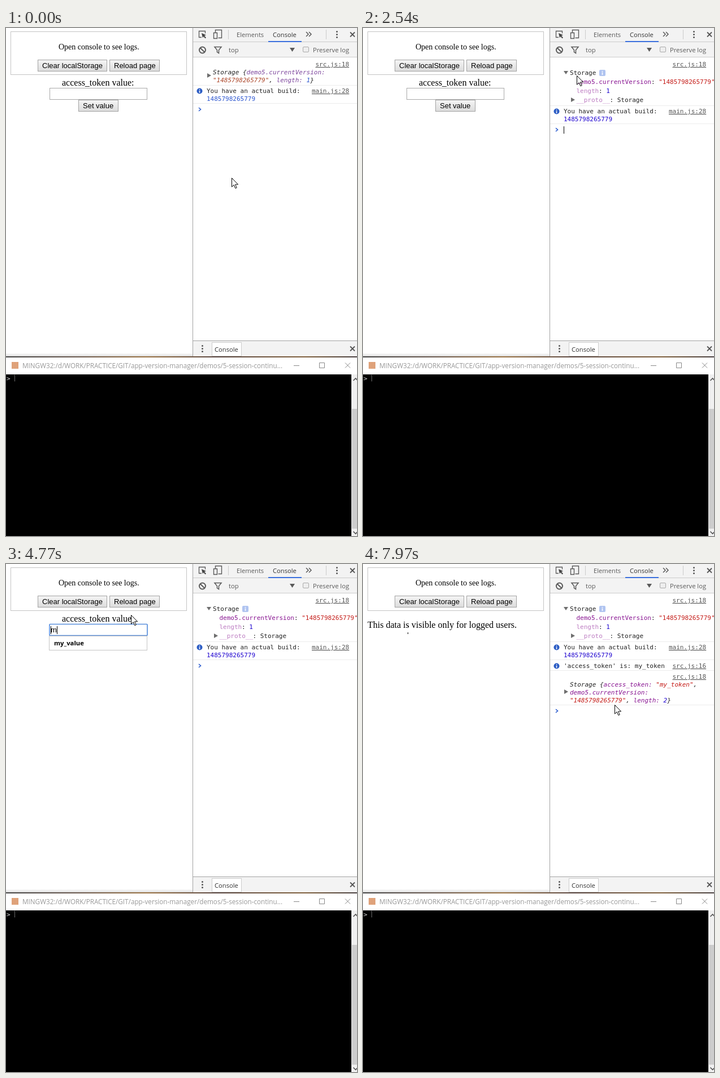
An HTML page that plays this animation: 621 by 899 pixels, repeating every 8 s.

```html
<!DOCTYPE html>
<html lang="en">
<head>
<meta charset="utf-8">
<title>Console demo</title>
<style>
html, body { margin: 0; width: 100%; height: 100%; overflow: hidden; background: #fff; }
svg { display: block; width: 621px; height: 899px; }
text { white-space: pre; }
.serif { font: 16px "Liberation Serif", serif; }
.sans { font: 13px "Liberation Sans", sans-serif; }
.ui { font: 11.2px "Open Sans", sans-serif; fill: #5a5a5a; }
.mono { font: 11px "DejaVu Sans Mono", monospace; fill: #222; }
.it { font-style: italic; }
.link { fill: #545454; text-decoration: underline; }
.k { fill: #7c449c; }
.s { fill: #ab4528; }
.n { fill: #2b55cf; }
.fresh .k { fill: #881391; }
.fresh .s { fill: #c41a16; }
.fresh .n { fill: #1c00cf; }
.dim { opacity: .55; }
.btn { fill: url(#face); stroke: #a2a2a2; }
.btn.over { stroke: #666; }
.row { stroke: #ececec; }
.line { fill: none; stroke: #5a5a5a; }
</style>
</head>
<body>
<svg id="stage" viewBox="0 0 621 899">
  <defs>
    <linearGradient id="face" x2="0" y2="1"><stop stop-color="#f5f5f5"/><stop offset="1" stop-color="#dcdcdc"/></linearGradient>
    <linearGradient id="strip"><stop stop-color="#444"/><stop offset=".2" stop-color="#6b5a50"/><stop offset=".4" stop-color="#9a7242"/><stop offset=".6" stop-color="#5a4640"/><stop offset=".85" stop-color="#80603c"/><stop offset="1" stop-color="#484040"/></linearGradient>
    <linearGradient id="shade" x2="0" y2="1"><stop stop-color="#fff"/><stop offset="1" stop-color="#ddd"/></linearGradient>
    <path id="cross" d="M0 0l8 8m0-8l-8 8" fill="none" stroke="#555" stroke-width="1.8"/>
    <path id="dots" d="M0 0h0m0 5h0m0 5h0" stroke="#555" stroke-width="3" stroke-linecap="round"/>
    <path id="closed" d="M0 0l7 4-7 4z" fill="#6e6e6e"/>
    <g id="info"><circle r="5" fill="#2b5cc4"/><path d="M0-3v1.6M0-.6v3.8" stroke="#fff" stroke-width="1.6"/></g>
  </defs>

  <!-- page -->
  <rect x="8.5" y="6.5" width="311" height="76" fill="none" stroke="#c4c4c4"/>
  <text class="serif" x="93" y="38" style="font-size:14px">Open console to see logs.</text>
  <rect class="btn" x="56.5" y="56.5" width="122" height="20"/>
  <text class="sans" x="64" y="71">Clear localStorage</text>
  <rect class="btn" x="183.5" y="56.5" width="88" height="20"/>
  <text class="sans" x="191" y="71">Reload page</text>
  <g id="form">
    <text class="serif" x="99" y="102">access_token value:</text>
    <rect x="77.5" y="106.5" width="172" height="20" fill="#fff" stroke="#a9a9a9"/>
    <rect class="btn" x="128.5" y="127.5" width="70" height="20"/>
    <text class="sans" x="136" y="142">Set value</text>
    <g id="focus">
      <rect x="77" y="106.5" width="173" height="20" rx="1" fill="#fff" stroke="#5a8fdc" stroke-width="1.7"/>
      <rect x="79" y="110" width="1" height="14"/>
      <text class="sans" id="typed" x="79" y="121"></text>
      <rect id="caret" y="110" width="1" height="14"/>
    </g>
    <g id="hint">
      <rect x="76.5" y="127.5" width="173" height="25" fill="#fff" stroke="#c4c4c4"/>
      <text x="85" y="144" style="font:bold 11.3px 'Open Sans',sans-serif">my_value</text>
    </g>
  </g>
  <g id="done">
    <text class="serif" x="8" y="113">This data is visible only for logged users.</text>
    <path d="M79.5 110v1m0 10v3" stroke="#000"/>
  </g>
  <rect y="575" width="330" height="6" fill="url(#shade)"/>

  <!-- console log -->
  <g id="log">
    <text class="mono link" x="547.5" y="68">src.js:18</text>
    <g id="brief">
      <use href="#closed" x="356" y="80"/>
      <text class="mono it" x="366" y="82">Storage {<tspan class="k">demo5.currentVersion:</tspan></text>
      <text class="mono it" x="366" y="96"><tspan class="s">"1485798265779"</tspan>, <tspan class="k">length:</tspan> <tspan class="n">1</tspan>}</text>
    </g>
    <g id="full">
      <path d="M355 76h8l-4 6z" fill="#6e6e6e"/>
      <text class="mono" x="366" y="83">Storage</text>
      <rect x="418" y="74" width="11" height="11" rx="2" fill="#b0c4f0"/>
      <path d="M423.5 76v1.5m0 1v4.5" stroke="#fff" stroke-width="1.5"/>
      <text class="mono" x="377.5" y="99"><tspan class="k">demo5.currentVersion</tspan>: <tspan class="s">"1485798265779"</tspan></text>
      <text class="mono k dim" x="377.5" y="115">length</text>
      <text class="mono" x="417" y="115">: <tspan class="n">1</tspan></text>
      <use href="#closed" x="368" y="123"/>
      <text class="mono k dim" x="377.5" y="131">__proto__</text>
      <text class="mono" x="436.5" y="131">: Storage</text>
    </g>
    <g id="build">
      <path class="row" d="M331 101.5h290M331 133.5h290"/>
      <use href="#info" x="342.5" y="111.5"/>
      <text class="mono" x="355" y="115">You have an actual build:</text>
      <text class="mono link" x="541" y="115">main.js:28</text>
      <text class="mono n" x="355" y="129">1485798265779</text>
    </g>
    <g id="token">
      <path class="row" d="M331 188.5h290M331 249.5h290"/>
      <use href="#info" x="342.5" y="180.5"/>
      <text class="mono" x="355" y="184">'access_token' is: my_token</text>
      <text class="mono link" x="547.5" y="184">src.js:16</text>
      <text class="mono link" x="547.5" y="203">src.js:18</text>
      <use href="#closed" x="356" y="222"/>
      <text class="mono it" x="366" y="217">Storage {<tspan class="k">access_token:</tspan> <tspan class="s">"my_token"</tspan>,</text>
      <text class="mono it k" x="366" y="231">demo5.currentVersion:</text>
      <text class="mono it" x="366" y="245"><tspan class="s">"1485798265779"</tspan>, <tspan class="k">length:</tspan> <tspan class="n">2</tspan>}</text>
    </g>
  </g>
  <g id="prompt">
    <path d="M341 141l3.5 3-3.5 3" fill="none" stroke="#2b5ccf" stroke-width="1.6"/>
    <rect id="bar" x="355" y="138" width="1" height="13"/>
  </g>
  <g id="tip">
    <rect x="429" y="112" width="138" height="25" rx="2" fill="#000" opacity=".12"/>
    <rect x="427.5" y="110.5" width="138" height="25" rx="1" fill="#fff" stroke="#bbb"/>
    <text class="ui" x="434" y="127" style="font-size:10.3px;fill:#888">["demo5.currentVersion"]</text>
  </g>

  <!-- developer tools frame -->
  <path d="M331 0h290v52h-290zM331 554h290v27h-290z" fill="#f3f3f3"/>
  <path d="M331 24.5h290M331 51.5h290M393.5 3v17M566.5 3v17" stroke="#ccc"/>
  <path d="M330.5 0v581M331 553.5h290" stroke="#a3a3a3"/>
  <rect x="464" y="23" width="59" height="2" fill="#3b70dd"/>
  <path class="line" d="M346 16.5h-4.5v-11h11v4" stroke-width="1.3"/>
  <path d="M346 9l8 3.5-3 1.2 3 3.3-1.5 1.4-3-3.4-1.5 2.6z" fill="#444"/>
  <path class="line" d="M370.5 8v-4.500h11v14h-6M367.500 8.500h6v10h-6z" stroke-width="1.4"/>
  <text class="ui" x="408" y="16">Elements</text>
  <text class="ui" x="472" y="16" style="fill:#333">Console</text>
  <path class="line" d="M531 7l4 4-4 4m5-8l4 4-4 4" stroke-width="1.5"/>
  <use href="#dots" x="585.5" y="6.500"/>
  <use href="#cross" x="609" y="7.500"/>
  <path class="line" d="M343.500 35l8 8M353 39a5.500 5.500 0 1 0-11 0a5.500 5.500 0 1 0 11 0" stroke-width="2"/>
  <path class="line" d="M369 33.500h12l-4.500 5.500v5.500l-3-2v-3.500z" stroke-width="1.500"/>
  <text class="ui" x="394" y="43">top</text>
  <path d="M502 35h9l-4.500 7z" fill="#5a5a5a"/>
  <rect x="525.5" y="33.5" width="10" height="9" rx="1.5" fill="#eee" stroke="#aaa"/>
  <text class="ui" x="543" y="43">Preserve log</text>
  <use href="#dots" x="347.5" y="562.500"/>
  <rect x="364.5" y="556.5" width="52" height="24" fill="#fff" stroke="#ccc"/>
  <text class="ui" x="369" y="573" style="fill:#333">Console</text>
  <use href="#cross" x="609" y="563.500"/>

  <!-- terminal window -->
  <rect y="581" width="621" height="2" fill="url(#strip)"/>
  <rect y="583" width="621" height="30" fill="#fff"/>
  <rect x="10" y="591" width="12" height="12" fill="#dfa27a"/>
  <text class="ui" x="29" y="602" style="font-size:11.7px;fill:#999">MINGW32:/d/WORK/PRACTICE/GIT/app-version-manager/demos/5-session-continu...</text>
  <path d="M509 597.500h10M554.500 592.500h9v9h-9zM600 592.500l9 9m0-9l-9 9" fill="none" stroke="#888"/>
  <rect y="613" width="611" height="286"/>
  <text class="mono" x="1" y="624" style="fill:#ddd">&gt;</text>
  <path d="M15.500 614v12" stroke="#ccc" stroke-dasharray="1 1"/>
  <rect x="611" y="613" width="10" height="286" fill="#f0f0f0"/>
  <rect x="612" y="674" width="9" height="212" fill="#cdcdcd"/>
  <path d="M614.500 624l4-4 4 4M614.500 891l4 4 4-4" fill="none" stroke="#555" stroke-width="1.600"/>

  <path id="mouse" d="M.5.5v15.700l3.700-3.500 2.600 6 2.400-1-2.600-5.800h5z" fill="#fff" stroke="#000"/>
</svg>
<script>
const $ = id => document.getElementById(id);
const show = (id, on) => $(id).style.display = on ? "" : "none";
const within = (t, a, b) => t >= a && t < b;

const LOOP = 8000, CLEAR = 1590, RELOADED = 1690, EXPAND = 2480, FOCUS = 4000, LOGIN = 7360;
const WORD = "my_token";
const KEY_TIMES = [4770, 4920, 5200, 5660, 5740, 5940, 6020, 6170];

// start, end, number of steps, evenly timed points
const MOVES = [
  [290, 1060, 16, [[399, 265], [334, 78]]],
  [1110, 1340, 6, [[334, 78], [244, 65]]],
  [1490, 2180, 15, [[244, 65], [287, 33], [351, 83], [355, 80]]],
  [2310, 2970, 14, [[355, 80], [357, 81], [410, 88], [427, 91], [378, 95]]],
  [3020, 3100, 3, [[378, 95], [430, 102]]],
  [3150, 3900, 17, [[430, 102], [520, 116], [370, 122], [217, 108]]],
  [4000, 4180, 4, [[217, 108], [221, 90]]],
  [6910, 7710, 17, [[221, 90], [172, 136], [255, 189]]],
  [7740, 7970, 6, [[255, 189], [445, 249]]]
];

// Catmull-Rom curve through the points, p from 0 to 1
function along(pts, p) {
  const last = pts.length - 1;
  const i = Math.min(last - 1, Math.floor(p * last)), u = p * last - i;
  const at = j => pts[Math.max(0, Math.min(last, j))];
  return [0, 1].map(c => {
    const [a, b, d, e] = [-1, 0, 1, 2].map(j => at(i + j)[c]);
    return b + u / 2 * (d - a + u * (2 * a - 5 * b + 4 * d - e + u * (3 * (b - d) + e - a)));
  });
}

function mouseAt(t) {
  const [a, b, n, pts] = MOVES.filter(m => m[0] <= t).pop() || [0, 1, 1, [MOVES[0][3][0], MOVES[0][3][0]]];
  const step = Math.min(n, 1 + Math.floor((t - a) / (b - a) * (n - 1) + 1e-6));
  return along(pts, step / n).map(Math.round);
}

function draw(t) {
  const blank = within(t, CLEAR, RELOADED), open = t >= EXPAND, logged = t >= LOGIN;
  const [x, y] = mouseAt(t);
  $("mouse").setAttribute("transform", `translate(${x} ${y})`);
  for (const b of document.querySelectorAll(".btn")) {
    const { x: bx, y: by, width: w, height: h } = b.getBBox();
    b.classList.toggle("over", within(x, bx, bx + w) && within(y, by, by + h));
  }

  $("stage").classList.toggle("fresh", t >= RELOADED);
  show("log", !blank);
  show("brief", !open);
  show("full", open);
  show("token", logged);
  $("build").setAttribute("transform", `translate(0 ${open ? 36 : 0})`);
  $("prompt").setAttribute("transform", `translate(0 ${blank ? -82 : logged ? 116 : open ? 36 : 0})`);
  show("bar", within(t, EXPAND, FOCUS) && (t - EXPAND) % 1000 < 520);
  $("tip").style.opacity = Math.max(0, Math.min(.75, (t - 2700) / 130, (3130 - t) / 215));

  const typed = KEY_TIMES.filter(k => k <= t).length;
  show("form", !blank && !logged);
  show("done", logged);
  show("focus", t >= FOCUS);
  show("hint", within(t, KEY_TIMES[0], KEY_TIMES[3]));
  $("typed").textContent = WORD.slice(0, typed);
  show("caret", typed > 0);
  if (typed && !logged) $("caret").setAttribute("x", Math.round(79 + $("typed").getComputedTextLength()));
}

const start = performance.now();
function tick() {
  draw((performance.now() - start) % LOOP);
  requestAnimationFrame(tick);
}
tick();
</script>
</body>
</html>
```
